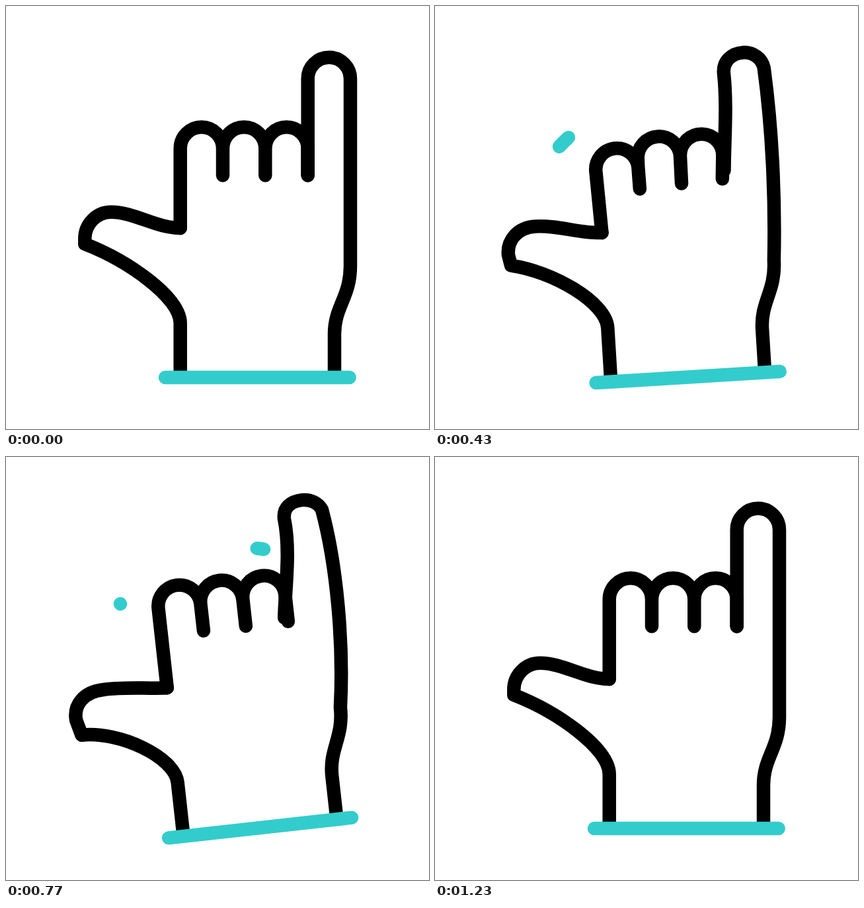
An HTML page that plays this animation: 640x640 px, repeating every 1.67 s.

```html
<!DOCTYPE html>
<html lang="en">
<head>
<meta charset="utf-8">
<title>Waving hand</title>
<style>
  html, body { margin: 0; height: 100%; overflow: hidden; background: #fff; }
  svg { display: block; width: 100vw; height: 100vh; }
  path { fill: none; stroke: #000; stroke-width: 20.5; stroke-linecap: round; stroke-linejoin: round; }
  .teal { stroke: #33cccc; }
</style>
</head>
<body>
<svg viewBox="0 0 640 640">
  <g id="hand">
    <path id="thumb"/>
    <path id="fingers"/>
    <path id="pinky"/>
    <path class="teal" d="M241 562H519.7"/>
    <path class="teal" id="swoosh1" pathLength="1" d="M367.4 80.7A220 220 0 0 0 131.4 240"/>
    <path class="teal" id="swoosh2" pathLength="1" d="M207.3 202A240 240 0 0 1 432.2 143.7"/>
  </g>
</svg>
<script>
const LOOP = 1670, STEP = 33.33, RADIUS = 32.15;
const $ = id => document.getElementById(id);

// Straight and bent poses with matching commands
const thumb = [
  'M263.7 558L263.7 480C263.7 441 186 386 119.3 360L119.3 352C119.3 330 137 311.8 159 311.8C194 311.8 227 336 263.7 336',
  'M263.7 558L263.7 480C263.7 441 184 393 127.6 394L121.5 370C120 346 138 328.7 168 328.7C199 327.7 232 334 263.7 336'
];
const pinky = [
  'M456.7 256.3C456.7 207 456.7 159 456.7 110C456.7 92.2 471 77.8 488.9 77.8C506.6 77.8 521 92.2 521 110' +
  'C521 205 521 299 521 394C521 440 497 455 497 496L497 558',
  'M451.5 250C458 205 473 150 468.3 101C468.3 84 481 76 498 76C511 76 522 83 526.3 93.5' +
  'C540 180 537 300 521 394C521 440 497 455 497 496L497 558'
];

// Knuckle centre x, then the curl: centre shift, turn in degrees, shift of the crease end
const knuckles = [
  { x: 295.85, shift: [-6.9, 53.1], turn: -6.9, crease: [-6, 34.2] },
  { x: 360.15, shift: [-6.5, 25], turn: 0, crease: [-7.5, 25.5] },
  { x: 424.5, shift: [-6.5, 25.7], turn: 9.7, crease: [-12, 19] }
];

function ease(t) {
  let lo = 0, hi = 1;
  for (let i = 0; i < 24; i++) {
    const s = (lo + hi) / 2;
    if (1.5 * s * (1 - s) + s ** 3 < t) lo = s; else hi = s;
  }
  return lo * lo * (3 - 2 * lo);
}

// keys: [time, value] pairs, eased in between
function track(keys, k) {
  if (k <= keys[0][0]) return keys[0][1];
  for (let i = 1; i < keys.length; i++) {
    const [t0, a] = keys[i - 1], [t1, b] = keys[i];
    if (k < t1) return a + (b - a) * ease((k - t0) / (t1 - t0));
  }
  return keys[keys.length - 1][1];
}

const swing = [[0, 0], [9, -22], [17, 15], [24, -7], [31, 4], [37, 0]];
const bend = [[0, 0], [9, 1], [17, 0], [24, 1], [31, 0]];
const curl = [[0, 0], [9, 1], [17, 0]];

function morph([a, b], w) {
  const target = b.match(/[\d.]+/g);
  let i = 0;
  return a.replace(/[\d.]+/g, n => (+n + (target[i++] - n) * w).toFixed(2));
}

function fingerPath(w) {
  let d = 'M263.7 336';
  for (const { x, shift, turn, crease } of knuckles) {
    const cx = x + shift[0] * w, cy = 215.4 + shift[1] * w;
    const angle = turn * w * Math.PI / 180;
    const dx = RADIUS * Math.cos(angle), dy = RADIUS * Math.sin(angle);
    const right = `${cx + dx} ${cy + dy}`;
    d += `L${cx - dx} ${cy - dy}A${RADIUS} ${RADIUS} 0 0 1 ${right}`;
    d += `L${x + RADIUS + crease[0] * w} ${256.3 + crease[1] * w}M${right}`;
  }
  return d.slice(0, d.lastIndexOf('M'));
}

function trim(path, from, to) {
  const visible = to - from > 0.002;
  path.style.display = visible ? '' : 'none';
  if (visible) path.setAttribute('stroke-dasharray', `0 ${from} ${to - from} 2`);
}

function draw(now) {
  const k = Math.floor((now % LOOP + 3.5) / STEP);
  const sweep = (start, end) => track([[start, 0], [end, 1]], k);
  const w = track(bend, k);
  $('hand').setAttribute('transform', `rotate(${track(swing, k)} 373.5 523)`);
  $('thumb').setAttribute('d', morph(thumb, w));
  $('pinky').setAttribute('d', morph(pinky, w));
  $('fingers').setAttribute('d', fingerPath(track(curl, k)));
  trim($('swoosh1'), sweep(8, 13), sweep(1, 9));
  trim($('swoosh2'), sweep(16, 24.4), sweep(11, 20));
}

const begin = performance.now();
function tick() {
  draw(performance.now() - begin);
  requestAnimationFrame(tick);
}
tick();
</script>
</body>
</html>
```
